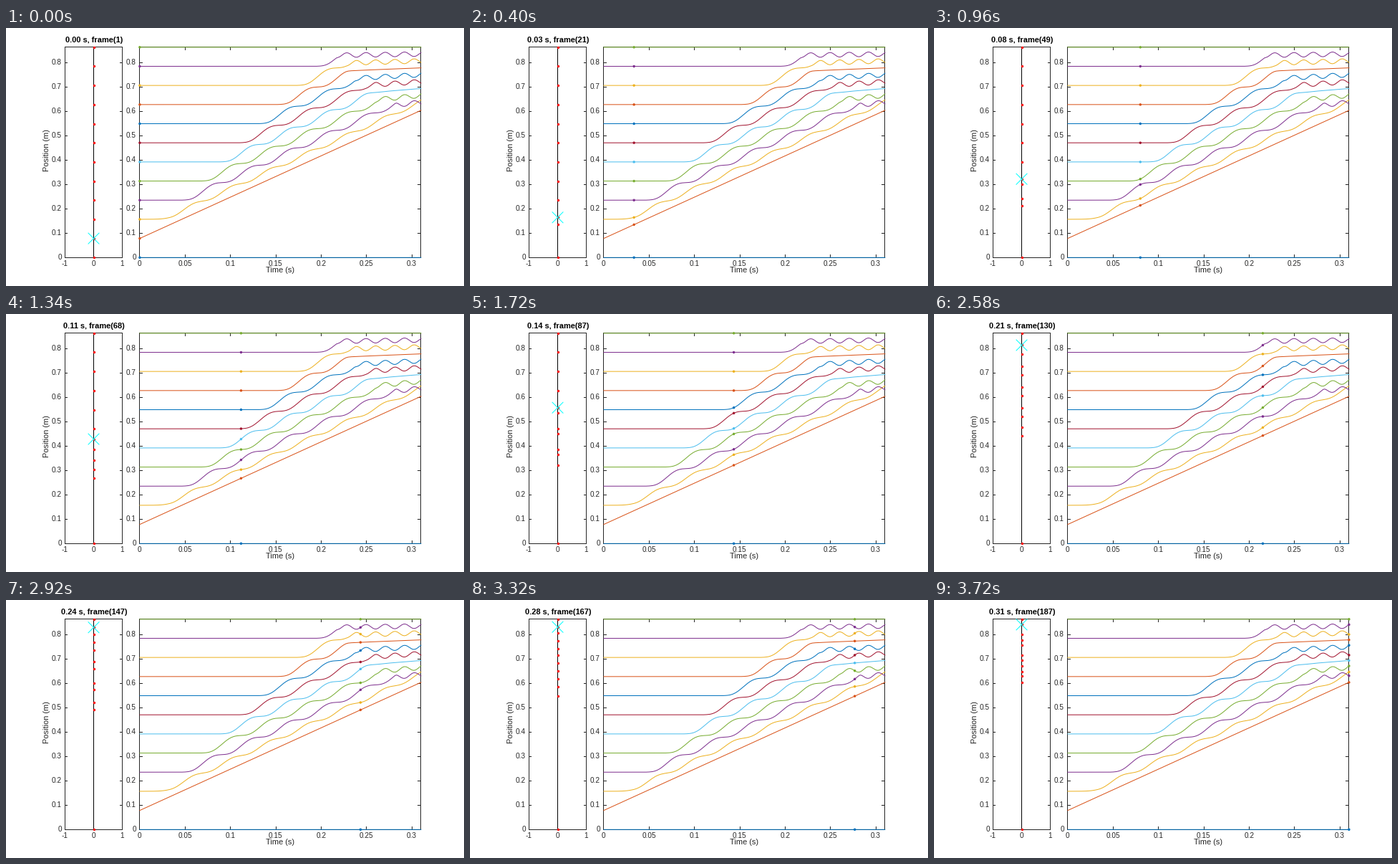
A matplotlib script that plays this animation: 640x360 px, repeating every 3740 ms.

```python
import numpy as np
import matplotlib.pyplot as plt
from matplotlib.animation import FuncAnimation

W, H, DPI = 640, 360, 100
PX = 72 / DPI                      # points per pixel
FRAMES, RATE = 187, 600            # samples and samples per second
END = (FRAMES - 1) / RATE
COUNT, GAP = 12, 0.0786            # bodies in the chain and their spacing
WALL = (COUNT - 1) * GAP
SPEED, LAG = 1.698, 0.0211         # piston speed, wave delay per body
RING, CREST = 0.0212, 0.2494       # period and crest time after reflection
TOP, BOTTOM = 26, 320
LEFT, RIGHT = (82, 162), (186, 579)
INK = "#262626"
CYCLE = ["#0072BD", "#D95319", "#EDB120", "#7E2F8E",
         "#77AC30", "#4DBEEE", "#A2142F"]
COLORS = [CYCLE[n % len(CYCLE)] for n in range(COUNT)]


def climb(n, t):
    """Stepwise rise of body n as the piston's wave passes."""
    mean, amp = (0.0212, 0.0075) if n == 2 else (0.0184, 0.0101)
    tau = t - 0.1433 - (n - 7) * LAG
    start = -LAG / 2
    foot = mean + SPEED * start
    rate = (SPEED - amp * np.pi / LAG) / foot
    tail = foot * np.exp(rate * np.minimum(tau - start, 0))
    steps = mean + SPEED * tau - amp * np.cos(np.pi * tau / LAG)
    return n * GAP + np.where(tau < start, tail, steps)


def ring(n, t):
    """Standing wave between the wall and the closing piston."""
    gap = 0.0298 - 0.05 * (t - 0.28)
    amp = -0.011 * np.sin(2 * np.pi * (n + 1) / 3)
    return WALL - (COUNT - 1 - n) * gap + amp * np.cos(2 * np.pi * (t - CREST) / RING)


def soft_min(a, b, width=0.002):
    return -width * np.logaddexp(-a / width, -b / width)


def path(n, t):
    if n in (0, COUNT - 1):
        return np.full_like(t, n * GAP)
    if n == 1:
        return GAP + SPEED * t
    if n == 2:                     # pushed by the piston all the way
        return climb(n, t)
    return soft_min(climb(n, t), ring(n, t))


def to_x(t):
    return RIGHT[0] + 0.4 + t / END * (RIGHT[1] - RIGHT[0])


def to_y(pos):
    return BOTTOM - 0.2 - pos / WALL * (BOTTOM - TOP - 0.5)


times = np.arange(FRAMES) / RATE
chain = np.array([path(n, times) for n in range(COUNT)])
rest = np.arange(COUNT) * GAP

plt.rcParams["font.family"] = "Liberation Sans"
fig = plt.figure(figsize=(W / DPI, H / DPI), dpi=DPI, facecolor="white")
ax = fig.add_axes([0, 0, 1, 1])
ax.set_xlim(-0.5, W - 0.5)         # whole numbers are pixel centres
ax.set_ylim(H - 0.5, -0.5)
ax.axis("off")


def line(xs, ys, color=INK, **kw):
    return ax.plot(xs, ys, color=color, lw=PX, snap=False, **kw)[0]


def label(x, y, text, size=10, **kw):
    kw = {"color": INK, "ha": "center", "va": "baseline", **kw}
    return ax.text(x, y, text, fontsize=size * PX, **kw)


def frame_box(box, tick, xticks):
    a, b = box
    line([a, b, b, a, a], [TOP, TOP, BOTTOM, BOTTOM, TOP])
    for x, text in xticks:
        mark = round(x)
        line([mark, mark], [BOTTOM, BOTTOM - tick])
        line([mark, mark], [TOP, TOP + tick])
        label(x - 0.3, 331, text)
    for k in range(9):
        y = round(to_y(k / 10))
        line([a, a + tick], [y, y])
        line([b, b - tick], [y, y])
        label(a - 4.5, y + 2.8, f"{k / 10:g}", ha="right")


frame_box(LEFT, 3, [(122 + 40 * k, str(k)) for k in (-1, 0, 1)])
frame_box(RIGHT, 4, [(to_x(k / 20), f"{k / 20:g}") for k in range(7)])
label(382.3, 340.5, "Time (s)", 11)
label(62, 170.5, "Position (m)", 11, rotation=90, ha="right", va="center")
title = label(122.5, 20, "", 11, color="black", weight="bold")

line([122, 122], [TOP, BOTTOM], "black")
for n in range(COUNT):
    line(to_x(times), to_y(chain[n]), COLORS[n], zorder=3)

beads = ax.plot([122] * COUNT, to_y(rest), "o", color="red",
                ms=3.4 * PX, mew=0, zorder=4)[0]
arm = 7.5 * np.array([-1, 1, np.nan, -1, 1])
rise = 7.5 * np.array([-1, 1, np.nan, 1, -1])
cross = line(122 + arm, rise, "cyan", zorder=5)
cursor = ax.scatter([0] * COUNT, [0] * COUNT, s=(3.5 * PX) ** 2,
                    linewidths=0, c=COLORS, snap=False, zorder=4)


def update(i):
    pos = chain[:, i]
    ys = to_y(pos)
    front = max(1, *np.flatnonzero(pos - rest > 0.004), 1)
    beads.set_ydata(ys)
    cross.set_ydata(ys[front] + rise)
    cursor.set_offsets(np.column_stack([np.full(COUNT, to_x(times[i])), ys]))
    title.set_text(f"{times[i]:.2f} s, frame({i + 1})")
    return beads, cross, cursor, title


anim = FuncAnimation(fig, update, frames=FRAMES, interval=20,
                     repeat=True, repeat_delay=0, blit=False)
plt.show()
```
